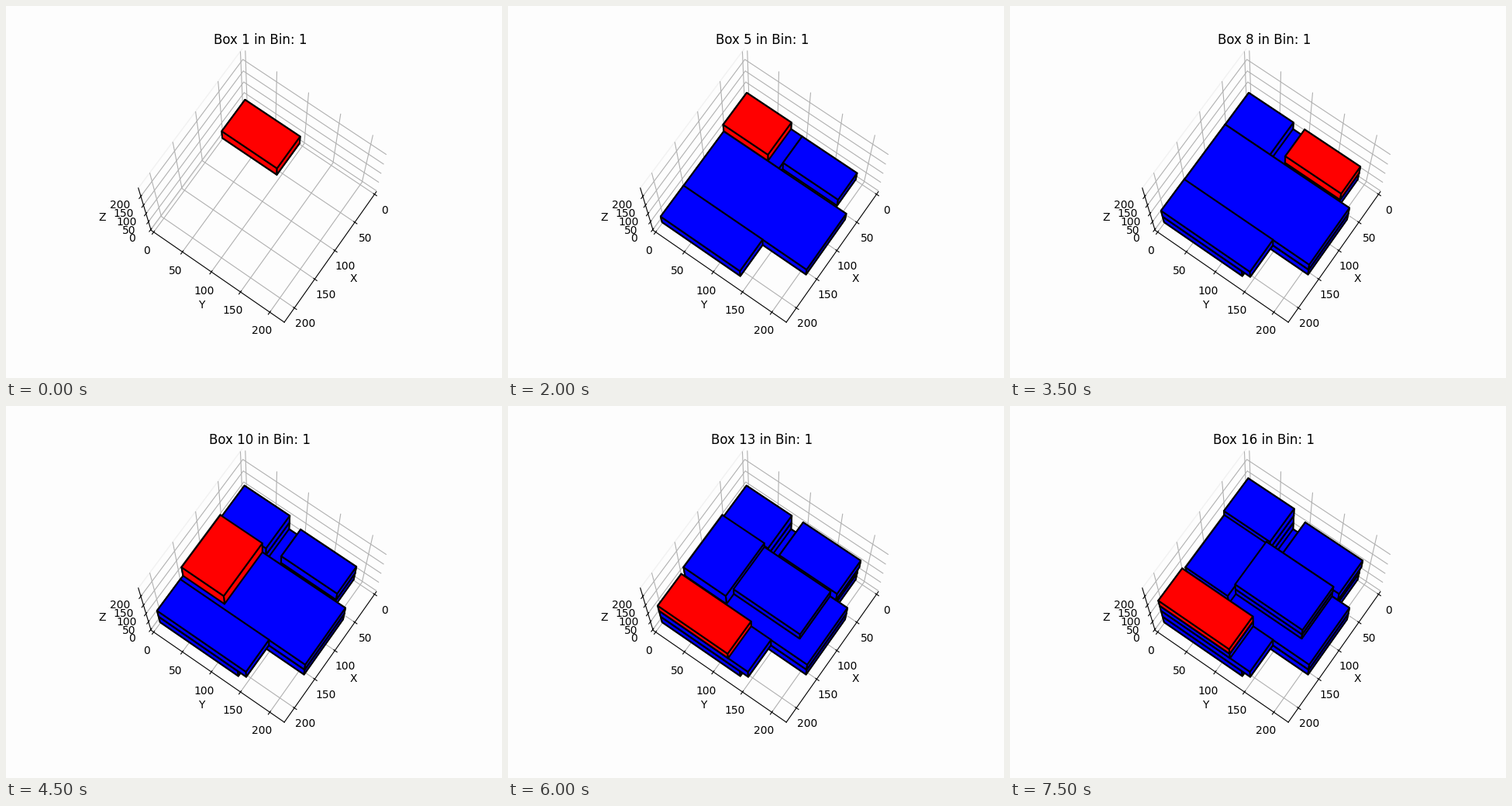
These frames come from a looping animation (640 px wide and 480 px high, 8000 ms). A matplotlib script:

```python
import matplotlib.pyplot as plt
from matplotlib.animation import FuncAnimation
from mpl_toolkits.mplot3d.art3d import Poly3DCollection

PAPER = "#fdfdfd"
BIN = (220, 220, 240)

# Each spot in the bin: its corner and the box sizes piled there, bottom up
SPOTS = {
    "A": ((0, 0), [(57, 95, 36)] + [(57, 76, 33.7)] * 3),
    "B": ((57, 0), [(97, 209, 35.3)] * 2 + [(90.5, 70, 47)]),
    "C": ((154, 0), [(54.5, y, 36) for y in (135, 149)] + [(54.5, 116, 30)] * 2),
    "D": ((0, 95), [(47, 93.5, 36)] * 2 + [(57, 95, 36)]),
    "E": ((57, 70), [(73, 110, 27.3)] * 2),
}
ORDER = "ABCDABCDABEDCEAC"


def overlaps(p, q):
    return all(p[k] < q[k] + q[k + 3] and q[k] < p[k] + p[k + 3] for k in (0, 1))


def pack(order):
    """Drop every box onto whatever already lies below it."""
    queues = {spot: iter(sizes) for spot, (_, sizes) in SPOTS.items()}
    placed = []
    for spot in order:
        box = (*SPOTS[spot][0], 0, *next(queues[spot]))
        z = max((b[2] + b[5] for b in placed if overlaps(b, box)), default=0)
        placed.append(box[:2] + (z,) + box[3:])
    return placed


def faces(x, y, z, dx, dy, dz):
    ring = [(x, y), (x + dx, y), (x + dx, y + dy), (x, y + dy)]
    top = z + dz
    sides = [[(*p, z), (*q, z), (*q, top), (*p, top)]
             for p, q in zip(ring, ring[1:] + ring[:1])]
    return [[(*p, h) for p in ring] for h in (z, top)] + sides


fig = plt.figure(figsize=(6.4, 4.8), dpi=100, facecolor=PAPER)
ax = fig.add_subplot(projection="3d", facecolor=PAPER)
ax.view_init(elev=75, azim=35)
ax.set_box_aspect((1, 1, 1))

axes = (ax.xaxis, ax.yaxis, ax.zaxis)
limits = (ax.set_xlim, ax.set_ylim, ax.set_zlim)
for axis, set_lim, size, name in zip(axes, limits, BIN, "XYZ"):
    margin = size / 48
    set_lim(-margin, size + margin)
    axis.pane.fill = False
    axis.set_label_text(name)
ax.xaxis.pane.set_edgecolor(PAPER)

boxes = pack(ORDER)
shown = []


def update(i):
    while shown:
        shown.pop().remove()
    # One collection, so that all faces are sorted by depth together
    polys = [face for box in boxes[:i + 1] for face in faces(*box)]
    colors = ["blue"] * (len(polys) - 6) + ["red"] * 6
    pile = Poly3DCollection(polys, linewidths=1.5, edgecolors="black",
                            facecolors=colors)
    shown.append(ax.add_collection3d(pile))
    ax.set_title(f"Box {i + 1} in Bin: 1")
    return shown


anim = FuncAnimation(fig, update, frames=len(boxes), interval=500,
                     repeat=True, repeat_delay=0, blit=False)
plt.show()
```
